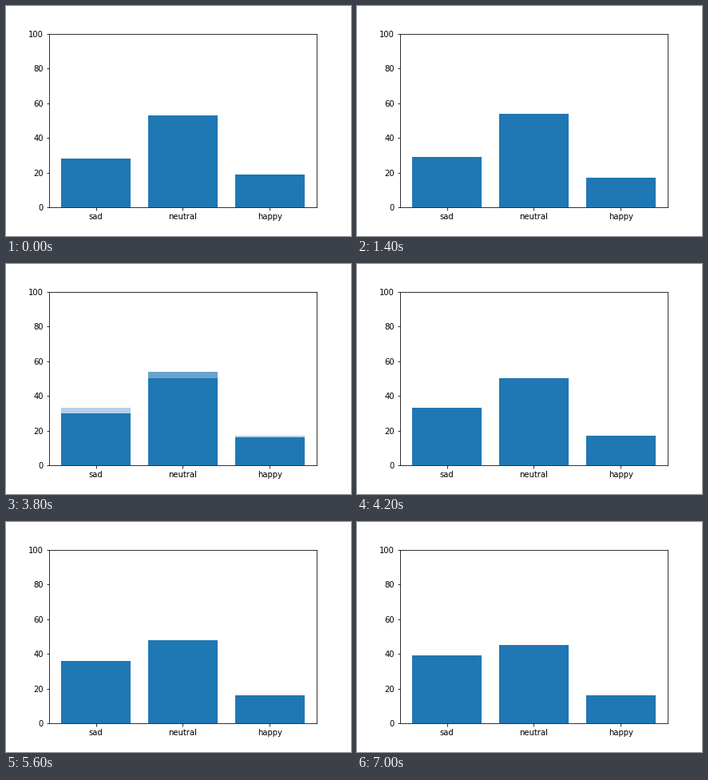
Animation, 432 px wide and 288 px high, one loop 8000 ms. Source, as a matplotlib script:

```python
import matplotlib.pyplot as plt
from matplotlib.animation import FuncAnimation

LABELS = ["sad", "neutral", "happy"]
STATES = [
    (28, 53, 19),
    (29, 54, 17),
    (30, 54, 16),
    (33, 50, 17),
    (36, 48, 16),
    (39, 45, 16),
]
BLUE = "#1f77b4"
STEP_MS = 200
HOLD_STEPS = 5
FADE_STEPS = 2
CYCLE = HOLD_STEPS + FADE_STEPS
FRAMES = len(STATES) * CYCLE - FADE_STEPS

plt.rcParams.update({"font.family": "DejaVu Sans", "font.size": 10})

fig, ax = plt.subplots(figsize=(6, 4), dpi=72, facecolor="white")
fig.subplots_adjust(left=0.125, right=0.9, bottom=0.125, top=0.88)

fading = ax.bar(LABELS, STATES[0], color=BLUE)
solid = ax.bar(LABELS, STATES[0], color=BLUE)
ax.set_ylim(0, 100)


def update(frame):
    index, phase = divmod(frame, CYCLE)
    mix = max(0, phase - HOLD_STEPS + 1) / (FADE_STEPS + 1)
    current = STATES[index]
    following = STATES[min(index + 1, len(STATES) - 1)] if mix else current

    # Cross-fade: the shared height stays opaque, only the difference blends.
    for back, front, old, new in zip(fading, solid, current, following):
        back.set_height(max(old, new))
        back.set_alpha(1 - mix if old > new else mix)
        front.set_height(min(old, new))
    return [*fading, *solid]


anim = FuncAnimation(fig, update, frames=FRAMES, interval=STEP_MS,
                     repeat=True, repeat_delay=0, blit=False)

plt.show()
```
